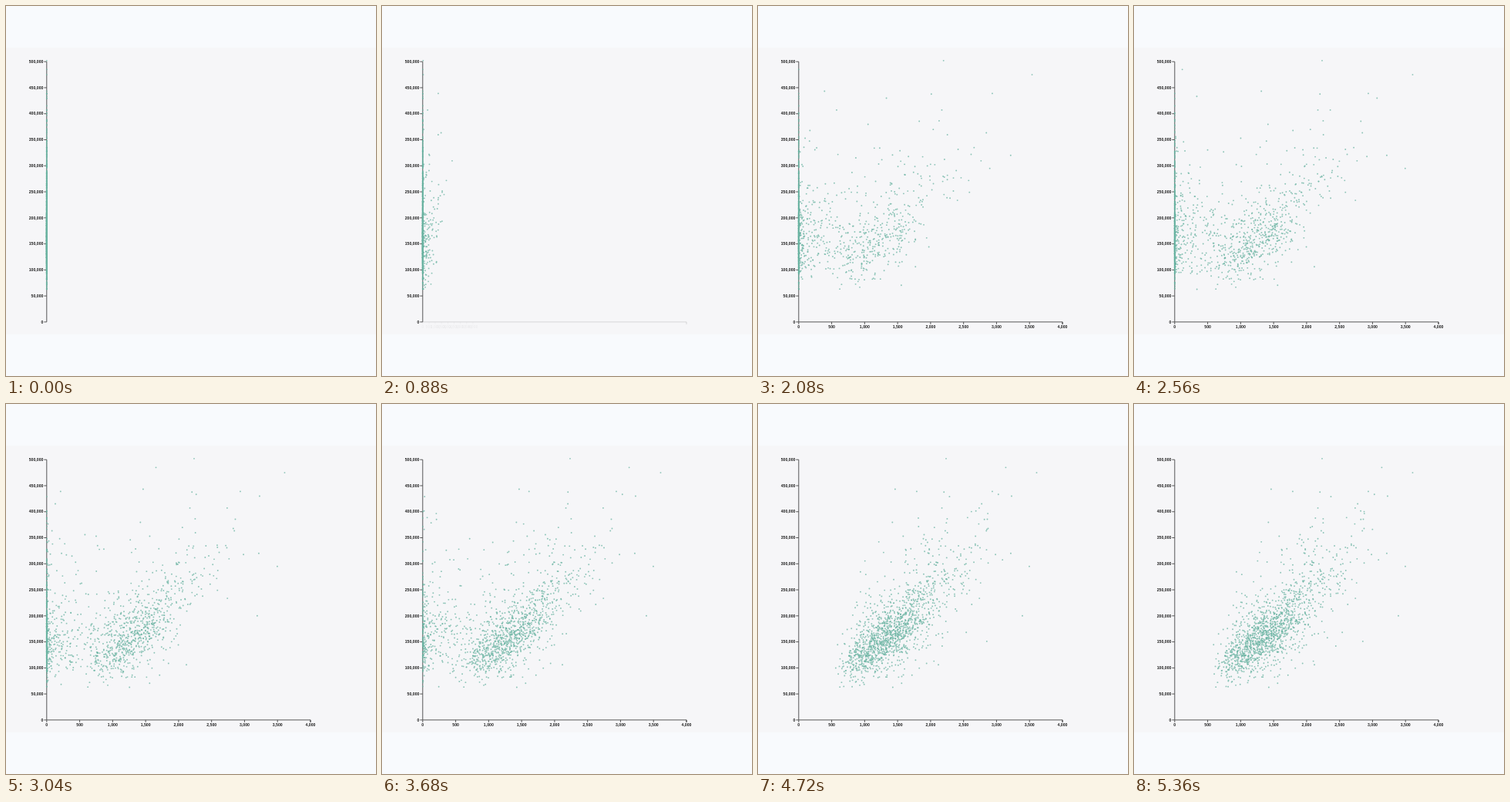
An HTML page with a canvas that plays this animation: 480x480 px, repeating every 5.44 s.

```html
<!DOCTYPE html>
<html>
<head>
<meta charset="utf-8">
<style>
  html, body { margin: 0; width: 100%; height: 100%; overflow: hidden; }
  body { background: linear-gradient(#f8fafd 54px, #f6f6f8 54px 426px, #f8fafd 426px); }
  canvas { display: block; width: 480px; height: 480px; filter: blur(0.5px); }
</style>
</head>
<body>
<canvas id="stage" width="480" height="480"></canvas>
<script>
const ctx = document.getElementById('stage').getContext('2d');
const LOOP = 5440, STEP = 80, BEGIN = 300, DURATION = 1600;
const COUNT = 1430, STAGGER = 2.4;
const LEFT = 52.8, RIGHT = 395, TOP = 72.2, BOTTOM = 409.9;
const scaleX = area => LEFT + area / 4000 * (RIGHT - LEFT);
const scaleY = price => BOTTOM - price / 500000 * (BOTTOM - TOP);

const ease = p => p < 0.5 ? 4 * p ** 3 : 1 - 4 * (1 - p) ** 3;
const progress = (t, start) => ease(Math.min(1, Math.max(0, (t - start) / DURATION)));

let seed = 20;
function random() {
  seed = (seed + 0x6D2B79F5) | 0;
  let r = Math.imul(seed ^ (seed >>> 15), 1 | seed);
  r = (r + Math.imul(r ^ (r >>> 7), 61 | r)) ^ r;
  return ((r ^ (r >>> 14)) >>> 0) / 4294967296;
}
const normal = () => Math.sqrt(-2 * Math.log(1 - random())) * Math.cos(2 * Math.PI * random());

// Far outliers: area, price, start time
const houses = [
  [2235, 502000, 740], [3608, 475000, 750], [2936, 439000, 445], [3140, 485000, 2225],
  [3228, 430000, 1330], [3216, 320000, 560], [3497, 295000, 1040], [3392, 200000, 1832]
];

// Log-normal living areas; prices rise with area, a third of them loosely
while (houses.length < COUNT) {
  const z = normal();
  const spread = random() < 0.65 ? 0.16 : 0.34;
  const area = 1430 * Math.exp(0.32 * z);
  const price = 165000 * Math.exp(0.27 * z + 0.04 * z * z + spread * normal());
  if (area < 550 || area > 3100 || price < 55000 || price > 470000) continue;
  houses.push([area, price, BEGIN + STAGGER * houses.length]);
}

function line(x1, y1, x2, y2) {
  ctx.beginPath();
  ctx.moveTo(x1, y1);
  ctx.lineTo(x2, y2);
  ctx.stroke();
}

function label(value, x, y, align) {
  ctx.textAlign = align;
  ctx.fillText(value.toLocaleString('en-US'), x, y);
}

function drawAxes(grow) {
  ctx.fillStyle = '#222';
  ctx.strokeStyle = '#444';
  ctx.lineWidth = 0.9;
  ctx.font = 'bold 5.2px "Liberation Sans", Arial, sans-serif';
  ctx.textBaseline = 'middle';

  line(LEFT, TOP, LEFT, BOTTOM);
  for (let price = 0; price <= 500000; price += 50000) {
    const y = scaleY(price);
    line(LEFT - 3.5, y, LEFT, y);
    label(price, 48.4, y + 0.3, 'right');
  }

  ctx.globalAlpha = grow;
  line(LEFT, BOTTOM, RIGHT, BOTTOM);
  line(RIGHT, BOTTOM, RIGHT, BOTTOM + 3);
  ctx.globalAlpha = grow * grow;
  for (let area = 0; area <= 4000; area += 500) {
    const x = scaleX(area * grow);
    line(x, BOTTOM, x, BOTTOM + 3);
    label(area, x, 416.6, 'center');
  }
  ctx.globalAlpha = 1;
}

function draw(t) {
  ctx.clearRect(0, 0, 480, 480);
  drawAxes(progress(t, BEGIN));

  ctx.fillStyle = 'rgba(105, 179, 162, 0.75)';
  for (const [area, price, start] of houses) {
    ctx.beginPath();
    ctx.arc(scaleX(area * progress(t, start)), scaleY(price), 0.95, 0, 2 * Math.PI);
    ctx.fill();
  }
}

function frame() {
  const t = performance.now() % LOOP;
  draw(Math.floor(t / STEP) * STEP);
  requestAnimationFrame(frame);
}
frame();
</script>
</body>
</html>
```
